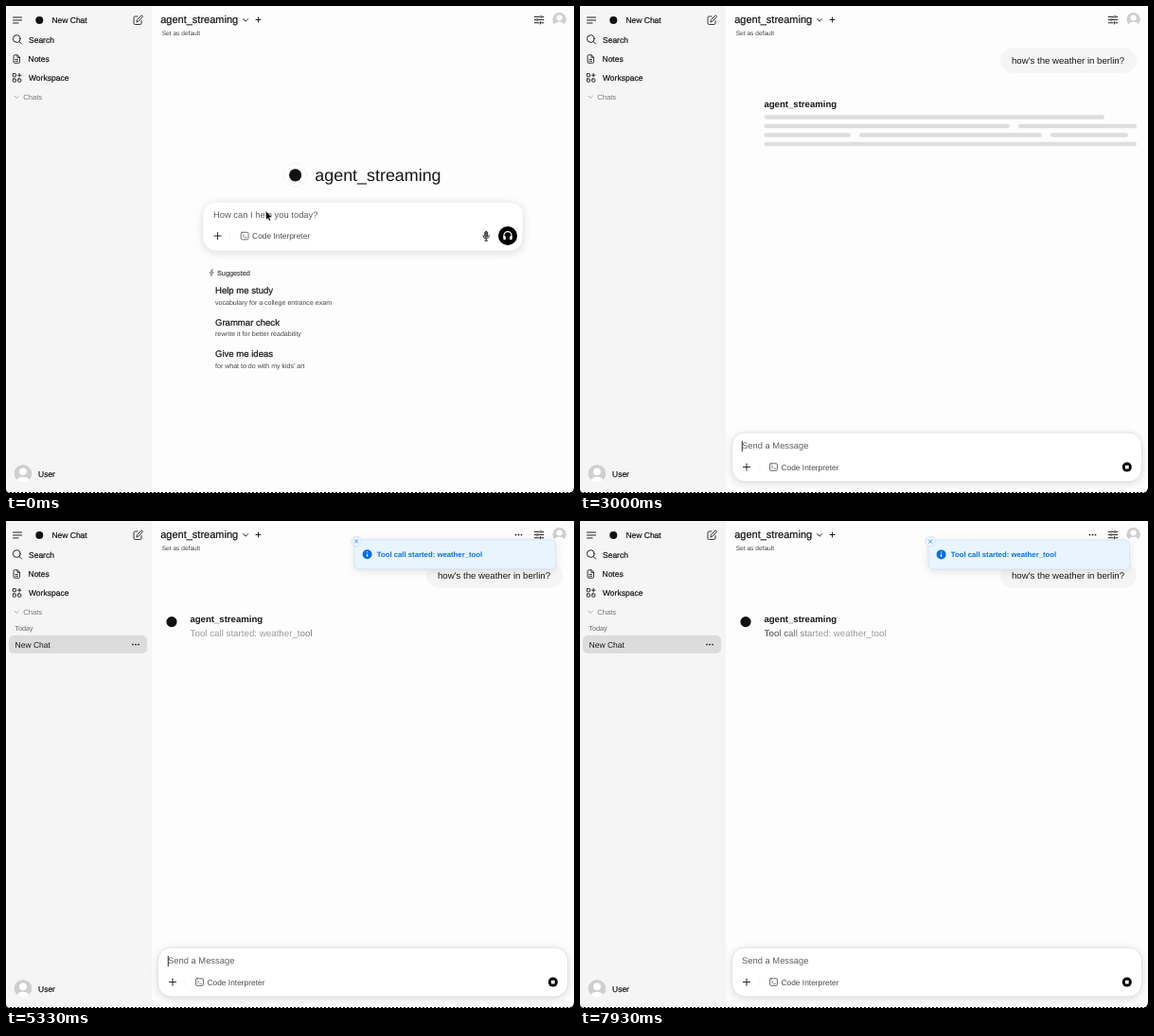
These frames come from a looping animation (600 by 515 pixels, 8000 ms). An HTML page:

```html
<!DOCTYPE html>
<html lang="en">
<head>
<meta charset="utf-8">
<title>Chat weather question</title>
<style>
html, body { margin: 0; width: 100%; height: 100%; overflow: hidden; background: #fdfdfd; }
svg { display: block; width: 100%; height: 100%; }
text { font-family: "Liberation Sans", Arial, sans-serif; fill: #171717; text-rendering: geometricPrecision; white-space: pre; }
.med { stroke: #171717; stroke-width: .22; }
.side { font-size: 8.5px; }
.body { font-size: 9.4px; }
.hint { fill: #5f5f5f; }
.tool { font-size: 8.4px; fill: #4a4a4a; }
.head { font-size: 9.55px; }
.note { font-size: 7.05px; fill: #444; }
.line { fill: none; stroke: #222; stroke-width: 1; stroke-linecap: round; stroke-linejoin: round; }
.bold { font-weight: bold; }
.box { fill: #fff; stroke: #ececec; stroke-width: .8; filter: drop-shadow(0 2px 4px rgba(0,0,0,.13)); }
.box.focus { stroke: #dcdcdc; }
</style>
</head>
<body>
<svg viewBox="0 0 600 515" xmlns="http://www.w3.org/2000/svg">
<defs>
  <linearGradient id="shine" gradientUnits="userSpaceOnUse" x1="-131" x2="131" y1="0" y2="0" spreadMethod="repeat">
    <stop offset=".25" stop-color="#9a9b9e"/>
    <stop offset=".5" stop-color="#2a2929"/>
    <stop offset=".75" stop-color="#9a9b9e"/>
  </linearGradient>
  <pattern id="dash" width="4" height="2" patternUnits="userSpaceOnUse"><rect width="2" height="2" fill="#111"/></pattern>
  <clipPath id="disc"><circle r="10"/></clipPath>
  <g id="plus"><path class="line" d="M-3.6 0H3.6M0-3.6V3.6"/></g>
  <g id="dots" fill="#222"><circle cx="-3" r=".9"/><circle r=".9"/><circle cx="3" r=".9"/></g>
  <g id="face" clip-path="url(#disc)">
    <circle r="10" fill="#cfcfd1"/>
    <circle cy="-2.2" r="4.1" fill="#fff"/>
    <ellipse cy="9.2" rx="7.6" ry="5.6" fill="#fff"/>
  </g>
  <g id="tools">
    <use href="#plus"/>
    <path d="M13-4V4" stroke="#f0f0f0" stroke-width=".8"/>
    <rect class="line" x="24.6" y="-3.8" width="7.8" height="7.6" rx="1.2" style="stroke:#4a4a4a;stroke-width:.8"/>
    <path class="line" d="M26.4-1.6L27.9-.2 26.4 1.2M28.7 1.7H30.4" style="stroke:#4a4a4a;stroke-width:.7"/>
    <text class="tool" x="36.5" y="3">Code Interpreter</text>
  </g>
</defs>

<rect width="600" height="515" fill="#fdfdfd"/>
<rect width="154" height="515" fill="#f5f5f6"/>

<!-- sidebar -->
<path class="line" d="M7.5 12H16.5M7.5 15H16.5M7.5 18H13"/>
<circle cx="35.3" cy="15" r="4" fill="#111"/>
<text class="side med" x="48.4" y="18">New Chat</text>
<path class="line" d="M139 11H136.3Q135 11 135 12.3V18.2Q135 19.5 136.3 19.5H141.7Q143 19.5 143 18.2V15.5M138 16.7L138.5 14.6 142.8 10.2Q143.6 9.8 144.2 10.5 144.6 11.2 144.1 11.8L139.9 16.1Z" style="stroke-width:.9"/>
<circle class="line" cx="11.2" cy="34.6" r="3.8"/><path class="line" d="M14 37.5L16.5 40"/>
<text class="side med" x="24" y="38.6">Search</text>
<path class="line" d="M8 52.8Q8 51.8 9 51.8H12.2L14.5 54.2V59.3Q14.5 60.3 13.5 60.3H9Q8 60.3 8 59.3ZM12 52V54.4H14.3M9.8 56.4H12.6M9.8 58.3H12.6" style="stroke-width:.9"/>
<text class="side med" x="23.5" y="59">Notes</text>
<g class="line" style="stroke-width:.95"><rect x="7.3" y="71.6" width="3.2" height="3.2" rx=".6"/><rect x="7.3" y="77" width="3.2" height="3.2" rx=".6"/><rect x="12.6" y="77" width="3.2" height="3.2" rx=".6"/><path d="M14.2 71.4V75M12.4 73.2H16"/></g>
<text class="side med" x="24" y="79.1">Workspace</text>
<path class="line" d="M9 95.2L11.2 97.4 13.4 95.2" style="stroke:#999;stroke-width:.8"/>
<text x="18.3" y="99" font-size="7.6" style="fill:#777">Chats</text>
<use href="#face" transform="translate(18 494.4) scale(.95)"/>
<text class="side med" x="34" y="497.6">User</text>
<g id="entry">
  <text x="9.3" y="115.5" font-size="7.3" style="fill:#666">Today</text>
  <rect x="3" y="121" width="146" height="19" rx="5" fill="#dcdcdc"/>
  <text class="side" x="9.6" y="133.7">New Chat</text>
  <use href="#dots" x="137" y="130.6"/>
</g>

<!-- header -->
<text class="med" x="163.2" y="18.3" font-size="11">agent_streaming</text>
<path class="line" d="M250.6 13.7L253.1 16.2 255.6 13.7"/>
<path class="line" d="M264 14.5H269M266.5 12V17"/>
<text x="164.7" y="30.8" font-size="6.6" style="fill:#444">Set as default</text>
<path class="line" d="M558.2 11.4H563.5M566 11.4H567.8M558.2 14.6H559.8M562 14.6H567.8M558.2 17.8H563M565.5 17.8H567.8M565 10.2V12.6M561 13.4V15.8M564.4 16.6V19"/>
<use href="#face" transform="translate(584.6 14.2) scale(.74)"/>

<!-- welcome view -->
<g id="home">
  <circle cx="305.6" cy="178.8" r="12" fill="#fff" stroke="#ededed" stroke-width=".7"/>
  <circle cx="305.6" cy="178.8" r="6.6" fill="#111"/>
  <text x="326.3" y="185" font-size="17.9">agent_streaming</text>
  <rect id="ask" class="box" x="208" y="207" width="338" height="52" rx="14"/>
  <text id="askText" class="body" x="219" y="224.2"></text>
  <use href="#tools" x="223.6" y="243.1"/>
  <g class="line" style="stroke-width:.9"><rect x="505.7" y="238.4" width="3" height="6" rx="1.5" fill="#666"/><path d="M503.9 242.6Q504 246 507.2 246 510.4 246 510.5 242.6M507.2 246V248.2M505.8 248.2H508.6"/></g>
  <circle cx="530" cy="243" r="10" fill="#000"/>
  <g id="phones"><path class="line" d="M526 244.5V242.6A4 4 0 0 1 534 242.6V244.5" style="stroke:#fff;stroke-width:1.2"/><rect x="525.4" y="243.3" width="2.5" height="4" rx="1" fill="#fff"/><rect x="532.1" y="243.3" width="2.5" height="4" rx="1" fill="#fff"/></g>
  <path id="send" class="line" d="M530 247V239.4M526.8 242.4L530 239.2 533.2 242.4" style="stroke:#fff;stroke-width:1.3"/>
  <g id="ideas">
    <path class="line" d="M218 278.6L215.2 282.4H217L216.4 285.6 219.2 281.6H217.4Z" style="stroke:#555;stroke-width:.7"/>
    <text x="223" y="284.7" font-size="7.3" style="fill:#444;stroke:#444;stroke-width:.18">Suggested</text>
    <text class="head med" x="221" y="304.3">Help me study</text>
    <text class="note" x="221" y="315.5">vocabulary for a college entrance exam</text>
    <text class="head med" x="221" y="337.9">Grammar check</text>
    <text class="note" x="221" y="349">rewrite it for better readability</text>
    <text class="head med" x="221" y="371.4">Give me ideas</text>
    <text class="note" x="221" y="382.5">for what to do with my kids' art</text>
  </g>
</g>

<!-- conversation view -->
<g id="chat">
  <rect x="444" y="44.3" width="144" height="26.4" rx="13.2" fill="#f5f5f5"/>
  <text x="456" y="61.2" font-size="9.65">how's the weather in berlin?</text>
  <text class="bold" x="194.4" y="106.7" font-size="9.6">agent_streaming</text>
  <g id="bars"></g>
  <text id="status" x="194.6" y="122.2" font-size="9.75" style="fill:url(#shine)">Tool call started: weather_tool</text>
  <rect class="box focus" x="160.5" y="451" width="433" height="52" rx="14"/>
  <text class="body hint" x="171" y="468.2">Send a Message</text>
  <use href="#tools" x="176" y="487.6"/>
  <circle cx="577.8" cy="487.6" r="5" fill="#000"/>
  <rect x="575.9" y="485.7" width="3.8" height="3.8" rx=".6" fill="#fff"/>
</g>
<g id="ready">
  <circle cx="175" cy="106.6" r="5.6" fill="#111"/>
  <use href="#dots" x="541.5" y="14.6"/>
</g>

<rect id="caret" width=".9" height="11.4" fill="#111"/>
<path id="arrow" d="M274.6 216.8V226L276.7 224.2 278.1 227.3 279.7 226.6 278.3 223.6H281.1Z" fill="#000" stroke="#fff" stroke-width=".6"/>
<g id="beam"><path class="line" d="M-2.4-5.6Q0-5.6 0-4V4Q0 5.6-2.4 5.6M2.4-5.6Q0-5.6 0-4M0 4Q0 5.6 2.4 5.6M-1.2 1.8H1.2" style="stroke:#111;stroke-width:.95"/></g>

<g id="toast">
  <rect x="368" y="20" width="212.6" height="31" rx="5" fill="#e9f5fe" stroke="#cfe2fb" stroke-width=".8" style="filter:drop-shadow(0 2px 4px rgba(0,0,0,.1))"/>
  <circle cx="381.6" cy="35.4" r="5" fill="#0b6fdb"/>
  <path d="M381.6 32.5V33.4M381.6 34.8V38" stroke="#fff" stroke-width="1.1"/>
  <text class="bold" x="391.8" y="38.2" font-size="7.75" style="fill:#0b6fdb">Tool call started: weather_tool</text>
  <circle cx="370.2" cy="21.6" r="5.3" fill="#e9f5fe" stroke="#cfe2fb" stroke-width=".8"/>
  <path class="line" d="M368.6 20L371.8 23.2M371.8 20L368.6 23.2" style="stroke:#0b6fdb;stroke-width:.7"/>
</g>

<!-- window edge -->
<rect y="514" width="600" height="1" fill="url(#dash)"/>
<path d="M0 511Q.4 514.6 4 515H0ZM600 509Q599.6 514.5 594 515H600Z" fill="#111"/>
</svg>
<script>
const LOOP = 8000, CLICK = 200, TYPED = 2470, SENT = 2930, READY = 3070, CALL = 5000;
const BLINKS = [CLICK, 730, 1270, 1730, 2270, 3470, 4000, 4470, CALL, 5530, 6000, 6530, 7000, 7530];
const BARS = [[194.5, 554, 0], [194.5, 454, 1], [463, 588, 1], [194.5, 286, 2], [295, 488, 2], [497, 579, 2], [194.5, 588, 3]];

const $ = id => document.getElementById(id);
const show = (id, on) => { $(id).style.display = on ? '' : 'none'; };
const put = (id, x, y) => $(id).setAttribute('transform', `translate(${x} ${y})`);
const span = (t, a, b) => Math.min(1, Math.max(0, (t - a) / (b - a)));

$('bars').innerHTML = BARS.map(([a, b, row]) =>
  `<rect x="${a}" y="${115.2 + row * 9.55}" width="${b - a}" height="4.5" rx="2.25"/>`).join('');

// CSS "ease" curve, solved by bisection
function ease(x) {
  let lo = 0, hi = 1;
  for (let i = 0; i < 20; i++) {
    const s = (lo + hi) / 2;
    if (.75 * s * (1 - s) + s ** 3 < x) lo = s; else hi = s;
  }
  return .3 * lo * (1 - lo) ** 2 + 3 * lo * lo * (1 - lo) + lo ** 3;
}

function draw(t) {
  const typed = t >= TYPED, sent = t >= SENT, call = t >= CALL;
  show('home', !sent);
  show('chat', sent);
  show('ideas', !typed);
  show('phones', !typed);
  show('send', typed);
  show('entry', t >= READY);
  show('ready', t >= READY);
  show('bars', !call);
  show('status', call);
  show('toast', call);
  $('bars').setAttribute('fill', t < READY ? '#dedede' : '#e3e3e3');
  $('ask').classList.toggle('focus', t >= CLICK);
  $('askText').textContent = typed ? "how's the weather in berlin?" : 'How can I help you today?';
  $('askText').classList.toggle('hint', !typed);

  show('caret', BLINKS.filter(b => t >= b).length % 2);
  put('caret', sent ? 170.8 : typed ? 336 : 218.8, sent ? 459.8 : 215);

  show('arrow', t < 70);
  show('beam', t >= 70 && !typed);
  const settle = span(t, 70, 330), drift = span(t, 1480, 1730);
  put('beam', 275.5 + 1.5 * settle + 6.3 * drift, 221 + 5 * settle - 9 * drift);

  const k = ease(span(t, 4965, 5365));
  put('toast', 0, -31 * (1 - k));
  $('toast').setAttribute('opacity', k);
  $('shine').setAttribute('gradientTransform', `translate(${325 + (t - CALL) * .131})`);
}

const start = performance.now();
function tick() {
  draw((performance.now() - start) % LOOP);
  requestAnimationFrame(tick);
}
tick();
</script>
</body>
</html>
```
